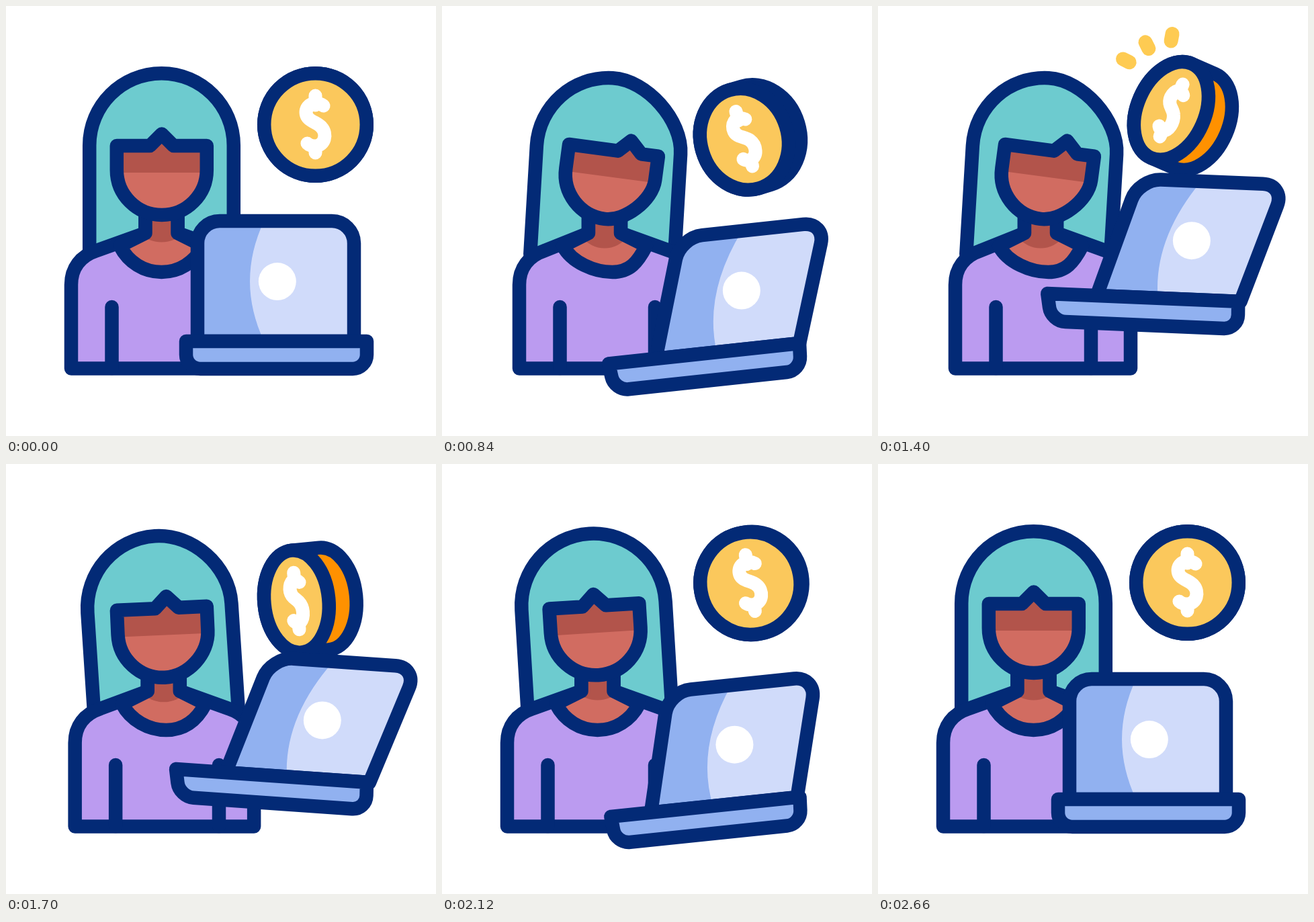
Recreate the animation shown at these times as an HTML page with a canvas. Size 640 px wide and 640 px high, loop 3 s.

```html
<!DOCTYPE html>
<html lang="en">
<head>
<meta charset="utf-8">
<title>Work and earn</title>
<style>
html, body { margin: 0; width: 100%; height: 100%; overflow: hidden; background: #fff; }
canvas { display: block; width: 640px; height: 640px; }
</style>
</head>
<body>
<canvas id="stage" width="640" height="640"></canvas>
<script>
const LOOP = 3000, LINE = 20.5, ROUND = 0.5523;
const NAVY = '#032a76', TEAL = '#6dcbcf', PURPLE = '#bb9bf0', SKIN = '#d16c61', SHADE = '#b2544b';
const YELLOW = '#fbc85c', ORANGE = '#ff9100', SPARK = '#fecb52', BLUE = '#91b1f0', PALE = '#d0dbfa';
const ctx = document.getElementById('stage').getContext('2d');

const rad = d => d * Math.PI / 180;
const part = (t, from, to) => Math.min(1, Math.max(0, (t - from) / (to - from)));

function ease(t, from, to) {
  const u = part(t, from, to);
  return u * u * (3 - 2 * u);
}

function paint(path, fill, line = NAVY, width = LINE) {
  if (fill) { ctx.fillStyle = fill; ctx.fill(path); }
  if (line) { ctx.strokeStyle = line; ctx.lineWidth = width; ctx.stroke(path); }
}

function at(x, y, deg, draw) {
  ctx.save();
  ctx.translate(x, y);
  ctx.rotate(rad(deg));
  draw();
  ctx.restore();
}

function clipped(path, draw) {
  ctx.save();
  ctx.clip(path);
  draw();
  ctx.restore();
}

// Closed polygon; radii[i] softens corner i, even when the shape is skewed
function polygon(points, radii) {
  const p = new Path2D(), n = points.length;
  points.forEach((c, i) => {
    const r = radii[i];
    const along = (q, d) => {
      const len = Math.hypot(q[0] - c[0], q[1] - c[1]);
      return [c[0] + (q[0] - c[0]) * d / len, c[1] + (q[1] - c[1]) * d / len];
    };
    const prev = points[(i + n - 1) % n], next = points[(i + 1) % n], inner = r * (1 - ROUND);
    p[i ? 'lineTo' : 'moveTo'](...along(prev, r));
    if (r) p.bezierCurveTo(...along(prev, inner), ...along(next, inner), ...along(next, r));
  });
  p.closePath();
  return p;
}

// Half round from the right side to the left; height < 0 arches upwards
function halfRound(p, r, y, height, rightBend) {
  const k = rightBend, tip = y + height;
  p.bezierCurveTo(r, y + height * k, r * k, tip, 0, tip);
  p.bezierCurveTo(-r * ROUND, tip, -r, y + height * ROUND, -r, y);
}

function drawHair(lean, nod) {
  at(231.5 + 16.5 * lean - 12 * nod, 207.5 + 6.8 * (lean + nod), 3.4 * lean - 7 * nod, () => {
    const r = 107.3, p = new Path2D();
    p.moveTo(r, 162);
    p.lineTo(r, 0);
    halfRound(p, r, 0, -r, ROUND - 0.08 * lean);
    p.lineTo(-r, 162);
    paint(p, TEAL);
  });
}

function drawBody(lean) {
  const left = 97 + 18 * lean, right = 366 + 10 * lean;
  const neck = 231.5 + 10.5 * lean, dip = 231.5 + 22 * lean;
  const neckL = neck - 24, neckR = neck + 24;
  const torso = new Path2D(`M${left} 539.5V415C${left} 390 ${left + 14} 372 ${left + 38} 364
    L${neckL} 338V312H${neckR}V338L${right - 38} 364
    C${right - 14} 372 ${right} 390 ${right} 415V539.5Z`);
  paint(torso, PURPLE);

  const chest = new Path2D(`M${neck - 62} 357C${neck - 49} 382 ${dip - 26} 396 ${dip} 396
    S${neck + 49} 382 ${neck + 62} 357L${neckR} 338V305H${neckL}V338Z`);
  paint(chest, SKIN, null);
  clipped(chest, () => {
    const shadow = new Path2D();
    shadow.ellipse(neck, 300, 50, 51.5 + 9 * lean, 0, 0, 2 * Math.PI);
    paint(shadow, SHADE, null);
  });
  paint(chest);
  paint(new Path2D(`M${left + 60.5} 448V539M317 448V539`));
}

function drawFace(lean, nod) {
  at(231.8 + 23.7 * lean - 10.8 * nod, 208 + 6.8 * (lean + nod), 7.6 * lean - 7.2 * nod, () => {
    const r = 67, fringe = 24 * lean, p = new Path2D();
    p.moveTo(-r, 0);
    p.lineTo(fringe - 17.5, 0);
    p.lineTo(fringe, -17.5);
    p.lineTo(fringe + 17.5, 0);
    p.lineTo(r, 0);
    p.lineTo(r, 36);
    halfRound(p, r, 36, r, ROUND - 0.1 * lean);
    p.closePath();
    paint(p, SKIN, null);
    clipped(p, () => {
      ctx.fillStyle = SHADE;
      ctx.fillRect(-80, -20, 160, 60);
    });
    paint(p);
  });
}

function drawWoman(t) {
  const down = ease(t, 200, 780), over = ease(t, 1400, 1880), back = ease(t, 1880, 2360);
  const lean = down - over, nod = over - back;
  drawHair(lean, nod);
  drawBody(lean);
  drawFace(lean, nod);
}

const dollar = new Path2D(`M0 -43V-29M12 -28C8 -31 4 -32 0 -32C-13 -31 -18 -17 -10 -9
  C-5 -4 4 -2 9 4C18 14 14 31 0 32C-5 32 -9 31 -12 28M0 32V42`);

function drawCoin(t) {
  const r = 76.3, half = Math.PI / 2;
  const spin = rad(51) * Math.sin(half * part(t, 200, 1700)) * (1 - ease(t, 1700, 2320));
  const rx = r * Math.cos(spin), depth = 68 * Math.sin(spin) ** 2;
  const x = 460.5 - depth * depth / 220;
  const y = 176.5 + 26.5 * ease(t, 200, 680) - 45 * ease(t, 680, 1300)
    + 48 * ease(t, 1300, 1780) - 29.5 * ease(t, 1780, 2160);
  const tilt = -18 * ease(t, 200, 790) + 44 * ease(t, 790, 1320)
    - 40 * ease(t, 1320, 1860) + 14 * ease(t, 1860, 2560);

  drawRays(x, y, ease(t, 1190, 1290), ease(t, 1310, 1470));
  at(x, y, tilt, () => {
    const edge = new Path2D();
    edge.ellipse(-depth / 2, 0, rx, r, 0, half, 3 * half);
    edge.ellipse(depth / 2, 0, rx, r, 0, -half, half);
    edge.closePath();
    paint(edge, ORANGE);
    const face = new Path2D();
    face.ellipse(-depth / 2, 0, rx, r, 0, 0, 4 * half);
    paint(face, YELLOW);
    const sign = new Path2D();
    sign.addPath(dollar, new DOMMatrix([(rx - 10) / 66, 0, 0, 1, -depth / 2, 0]));
    paint(sign, null, '#fff', 20);
  });
}

// Three rays fan out from the coin; each grows outwards, then shrinks to its tip
function drawRays(x, y, drawn, erased) {
  if (drawn <= erased) return;
  const p = new Path2D();
  for (let i = -1; i <= 1; i++) {
    const place = rad(243 + 19.6 * i), dir = rad(243.5 + 37 * i);
    const point = f => [
      x + 123 * Math.cos(place) - 27 * (1 - f) * Math.cos(dir),
      y + 123 * Math.sin(place) - 27 * (1 - f) * Math.sin(dir)];
    p.moveTo(...point(erased));
    p.lineTo(...point(drawn));
  }
  paint(p, null, SPARK, 21);
}

function drawLaptop(t) {
  const turn = ease(t, 200, 800) - ease(t, 1920, 2640);
  const toss = 1.05 * ease(t, 800, 1640) - 1.14 * ease(t, 1640, 2120) + 0.09 * ease(t, 2120, 2640);
  const hinge = 499 + 31 * ease(t, 200, 710) - 98 * ease(t, 710, 1280)
    + 78 * ease(t, 1280, 2120) ** 1.3 - 11 * ease(t, 2120, 2640);
  const slope = Math.tan(rad(10.2 * toss - 6.2 * turn));
  const point = (x, up) => [x, hinge + (x - 394) * slope - up];

  const top = 179 - 2.5 * turn;
  const lid = [
    point(285 + 69 * turn + 41 * toss, top), point(518 + 52.5 * turn + 42 * toss, top),
    point(518 + 14 * turn + 9 * toss, 0), point(285 + 33 * turn + 9 * toss, 0)];
  const base = [
    point(268 - 20 * turn + 5 * toss, 0), point(537 - 5 * turn + 5 * toss, 0),
    point(537 - 3 * turn + 2 * toss, -41), point(268 - 11 * turn + toss, -41)];

  // Position on the lid: u across, v down
  const mix = (a, b, f) => [a[0] + (b[0] - a[0]) * f, a[1] + (b[1] - a[1]) * f];
  const uv = (u, v) => mix(mix(lid[0], lid[1], u), mix(lid[3], lid[2], u), v);

  const screen = polygon(lid, [33, 33, 0, 0]);
  paint(screen, PALE, null);
  clipped(screen, () => {
    const p = new Path2D();
    p.moveTo(...uv(0, 0));
    p.lineTo(...uv(.425, 0));
    p.quadraticCurveTo(...uv(.245, .5), ...uv(.425, 1));
    p.lineTo(...uv(0, 1));
    paint(p, BLUE, null);
  });
  paint(screen);
  const dot = new Path2D();
  dot.arc(...uv(.51, .503), 28, 0, 2 * Math.PI);
  paint(dot, '#fff', null);
  paint(polygon(base, [0, 0, 21, 21]), BLUE);
}

function render(t) {
  ctx.fillStyle = '#fff';
  ctx.fillRect(0, 0, 640, 640);
  ctx.lineCap = ctx.lineJoin = 'round';
  drawWoman(t);
  drawCoin(t);
  drawLaptop(t);
}

const start = performance.now();
function tick() {
  render((performance.now() - start) % LOOP);
  requestAnimationFrame(tick);
}
tick();
</script>
</body>
</html>
```
